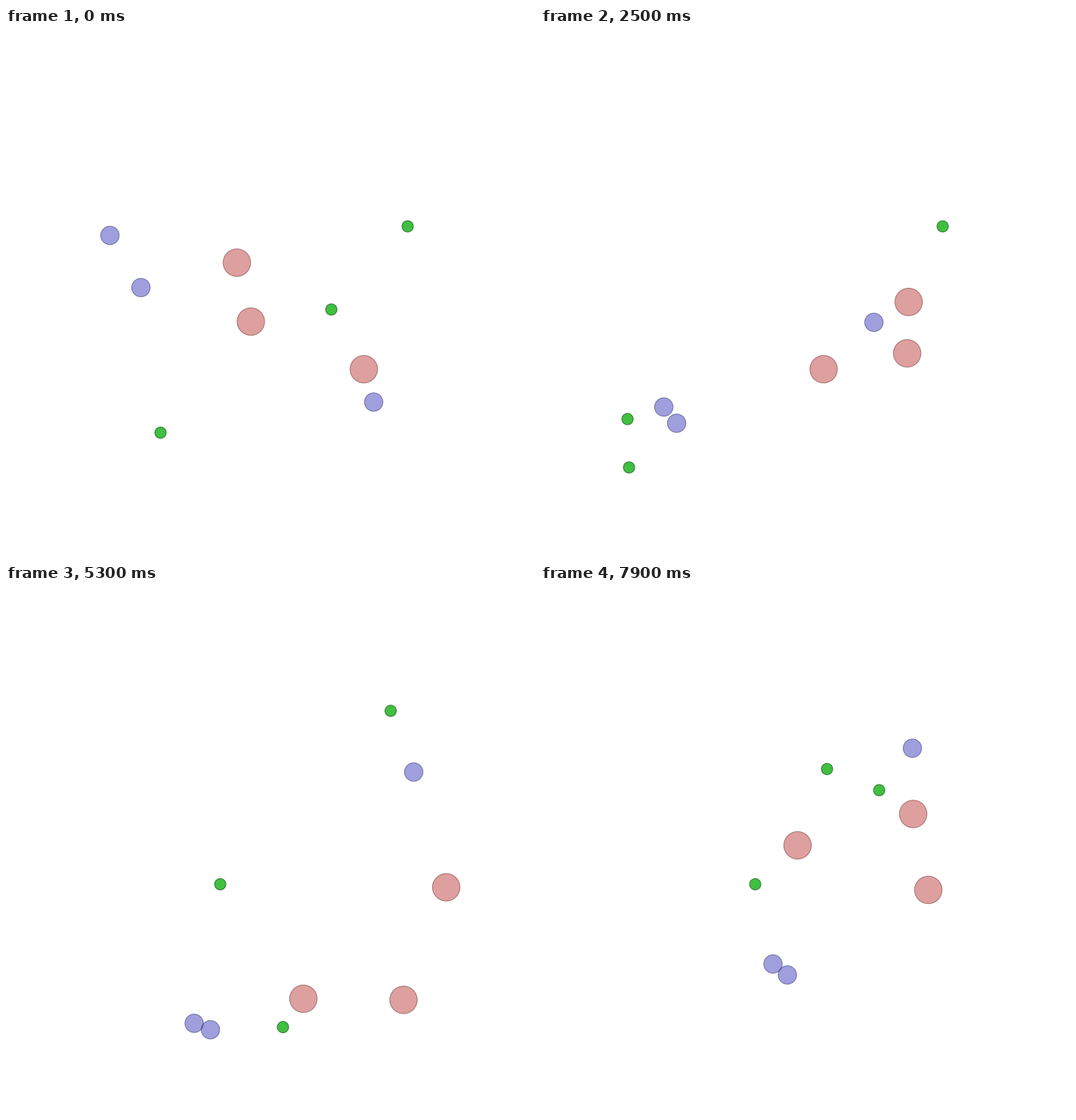
Write a matplotlib script that moves like this. It is 700 px wide and 700 px high and loops after 8 s.

```python
import numpy as np
import matplotlib.pyplot as plt
from matplotlib.animation import FuncAnimation
from matplotlib.patches import Circle

SIZE, DPI = 700, 100
FRAMES, INTERVAL = 80, 100
SHEEP_RADIUS, WOLF_RADIUS, GRASS_RADIUS = 12.2, 18.2, 7.5
REACH = SHEEP_RADIUS + GRASS_RADIUS + 0.1

# Steps at which the herd turns, and where each animal is then
TURNS = np.array([0, 13, 21, 25, 38, 43, 53, 70, 79])
WOLVES = [
    [(305, 310), (541, 355), (506, 357), (486, 362), (516, 398),
     (528.5, 411), (582, 399.5), (500, 419), (492, 302.5)],
    [(323.5, 388), (384.5, 476), (379, 457), (373.5, 451), (362, 468),
     (358, 474.5), (393, 547), (293, 421), (339, 344)],
    [(473, 451), (579, 384), (510, 410), (484, 430), (627, 495),
     (604, 503), (525.5, 548.5), (401, 453), (512, 403)],
]
SHEEP = [
    [(137, 274), (166, 453.5), (163, 489), (162, 501), (99, 546),
     (113, 565), (248.5, 579.5), (326, 572), (306.5, 501)],
    [(178, 343), (180.5, 482), (192, 520), (179, 522.5), (130, 568),
     (141.5, 574), (270, 588), (346.5, 587), (325.5, 515.5)],
    [(486, 494.5), (452, 415.5), (438, 389), (440, 389), (505, 303),
     (524, 286.5), (539, 247), (526.5, 173.3), (491, 215.5)],
]
# Each tuft grows again at its next spot once a sheep has eaten it
TUFTS = [
    [(531, 262), (283, 395.5)],
    [(430, 372), (114, 517), (366, 584.5), (378, 243)],
    [(204, 535), (116, 581), (508.5, 166), (447, 271)],
]


def smooth_path(points):
    """Cubic Hermite curve through the points, sampled at every step."""
    t, p = TURNS, np.array(points, float)
    v = np.gradient(p, t, axis=0)
    steps = np.arange(FRAMES)
    i = np.clip(np.searchsorted(t, steps, side="right") - 1, 0, len(t) - 2)
    h = (t[i + 1] - t[i])[:, None]
    u = (steps - t[i])[:, None] / h
    return ((1 + 2 * u) * (1 - u) ** 2 * p[i] + u * (1 - u) ** 2 * h * v[i]
            + u ** 2 * (3 - 2 * u) * p[i + 1] + u ** 2 * (u - 1) * h * v[i + 1])


def grazed_path(spots, flock):
    """Position of a tuft at every step, moving on after a sheep touches it."""
    spots, path = list(spots), []
    for herd in np.stack(flock, axis=1):
        path.append(spots[0])
        gap = np.hypot(*(herd - spots[0]).T).min()
        if gap < REACH and len(spots) > 1:
            spots.pop(0)
    return path


fig = plt.figure(figsize=(SIZE / DPI, SIZE / DPI), dpi=DPI, facecolor="white")
ax = fig.add_axes([0, 0, 1, 1])
ax.set_xlim(-0.5, SIZE - 0.5)
ax.set_ylim(SIZE - 0.5, -0.5)
ax.axis("off")


def add_discs(paths, radius, color, alpha, edge_alpha):
    edge = tuple(c / 2 for c in color)
    return [(ax.add_patch(Circle(path[0], radius, facecolor=color + (alpha,),
                                 edgecolor=edge + (edge_alpha,),
                                 linewidth=72 / DPI)), path)
            for path in paths]


flock = [smooth_path(points) for points in SHEEP]
pack = [smooth_path(points) for points in WOLVES]
grass = [grazed_path(spots, flock) for spots in TUFTS]
movers = (add_discs(flock, SHEEP_RADIUS, (0.25, 0.25, 0.75), 0.5, 0.5)
          + add_discs(pack, WOLF_RADIUS, (0.75, 0.25, 0.25), 0.5, 0.5)
          + add_discs(grass, GRASS_RADIUS, (0.25, 0.75, 0.25), 1, 0.8))


def draw(step):
    for disc, path in movers:
        disc.center = path[step]
    return [disc for disc, _ in movers]


anim = FuncAnimation(fig, draw, frames=FRAMES, interval=INTERVAL,
                     repeat=True, repeat_delay=0)
plt.show()
```
